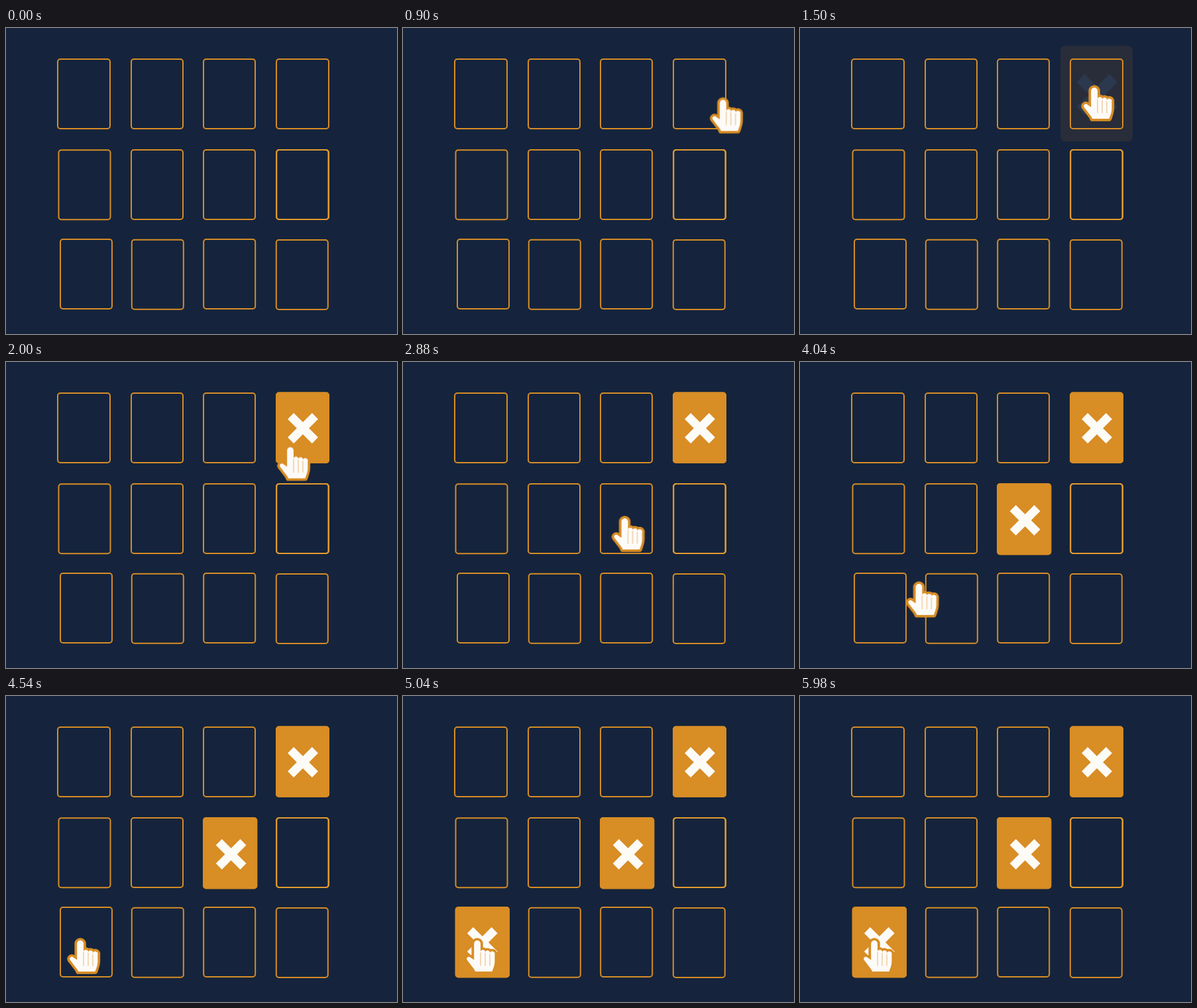
Write an HTML page that moves like this. It is 590 by 462 pixels and loops after 6 s.

```html
<!DOCTYPE html>
<html lang="en">
<head>
<meta charset="utf-8">
<title>Card picks</title>
<style>
  html, body { margin: 0; width: 100%; height: 100%; overflow: hidden; background: #15243c; }
  svg { display: block; width: 590px; height: 462px; }

  .slots { fill: none; stroke: #d68c26; stroke-width: 2; }
  .card rect { fill: #d88d25; }
  .card path { stroke: #fdfbf6; stroke-width: 12.8; }
  .card { transform-box: fill-box; transform-origin: center; animation: 6s ease-in-out infinite; }
  .first { animation-name: pop1; }
  .second { animation-name: pop2; }
  .third { animation-name: pop3; }

  .across { animation: across 6s linear infinite; }
  .down { animation: down 6s linear infinite; }
  .rim { fill: #d88d25; stroke: #d88d25; stroke-width: 7.6; stroke-linejoin: round; }
  .skin { fill: #fdfbf8; }
  .gaps { fill: none; stroke: #e9c48f; stroke-width: 1.2; stroke-linecap: round; }

  @keyframes pop1 {
    0%, 24% { opacity: 0; transform: scale(1.38); }
    28.67%, 100% { opacity: 1; transform: none; }
  }
  @keyframes pop2 {
    0%, 48.67% { opacity: 0; transform: scale(1.38); }
    53.33%, 100% { opacity: 1; transform: none; }
  }
  @keyframes pop3 {
    0%, 75.67% { opacity: 0; transform: scale(1.38); }
    80.33%, 100% { opacity: 1; transform: none; }
  }

  /* Separate easing per axis bends the pointer's path. */
  @keyframes across {
    0%, .67% { transform: translateX(591px); animation-timing-function: cubic-bezier(.333, .417, .667, .75); }
    20.67%, 29% { transform: translateX(424px); animation-timing-function: cubic-bezier(.37, 0, .63, 1); }
    46.83%, 55% { transform: translateX(314.5px); animation-timing-function: cubic-bezier(.37, 0, .63, 1); }
    74.67%, 100% { transform: translateX(92px); }
  }
  @keyframes down {
    0%, .67% { transform: translateY(211px); animation-timing-function: cubic-bezier(.35, .25, .65, 1); }
    20.67%, 29% { transform: translateY(86px); animation-timing-function: cubic-bezier(.3, .2, .6, 1); }
    46.83%, 55% { transform: translateY(232px); animation-timing-function: cubic-bezier(.35, .2, .65, 1); }
    74.67%, 100% { transform: translateY(365px); }
  }
</style>
</head>
<body>
<svg viewBox="0 0 590 462">
  <defs>
    <path id="cross" d="M-18.4-18.4 18.4 18.4M18.4-18.4-18.4 18.4"/>
    <path id="hand" d="M15.2 33.5V9a4.9 4.9 0 0 1 9.8 0V21.5a3.5 3.5 0 0 1 7 .6a3.5 3.5 0 0 1 7 1.5a3.7 3.7 0 0 1 7.4 1.8V35C46.4 42 44.5 45 42.5 51H17C16 47 11.5 43 8.5 38.5L4.6 33.6C3 30.5 6 27.8 9 29.3Z"/>
  </defs>

  <g class="slots">
    <rect x="78" y="47" width="79" height="105" rx="4"/>
    <rect x="189" y="47" width="78" height="105" rx="4"/>
    <rect x="298" y="47" width="78" height="105" rx="4"/>
    <rect x="408" y="47" width="79" height="105" rx="4"/>
    <rect x="79.5" y="184.3" width="78" height="105" rx="4"/>
    <rect x="189" y="184" width="78" height="105" rx="4"/>
    <rect x="298" y="184" width="78" height="105" rx="4"/>
    <rect x="408" y="184" width="78.4" height="105" rx="4"/>
    <rect x="408.3" y="184" width="78.7" height="105" rx="4" stroke="#e39a30"/>
    <rect x="82" y="319" width="78" height="105" rx="4"/>
    <rect x="189.8" y="319.7" width="78" height="105" rx="4"/>
    <rect x="298.2" y="319" width="78" height="105" rx="4"/>
    <rect x="407.8" y="320" width="78" height="105" rx="4"/>
  </g>

  <g class="card first">
    <rect x="407" y="45.3" width="81" height="107.7" rx="5"/>
    <path d="M429.6 81.6 466.4 118.4M466.4 81.6 429.6 118.4"/>
  </g>
  <g class="card second">
    <rect x="297" y="183" width="82.4" height="108.5" rx="5"/>
    <path d="M321.2 220.6 358 257.4M358 220.6 321.2 257.4"/>
  </g>
  <g class="card third">
    <rect x="78.5" y="318" width="82.5" height="107.5" rx="5"/>
    <path d="M101.4 353.6 138.2 390.4M138.2 353.6 101.4 390.4"/>
  </g>

  <g class="across">
    <g class="down">
      <use href="#hand" class="rim"/>
      <use href="#hand" class="skin"/>
      <path class="gaps" d="M25 22V42M32 23V42M39 25V42"/>
    </g>
  </g>
</svg>
</body>
</html>
```
